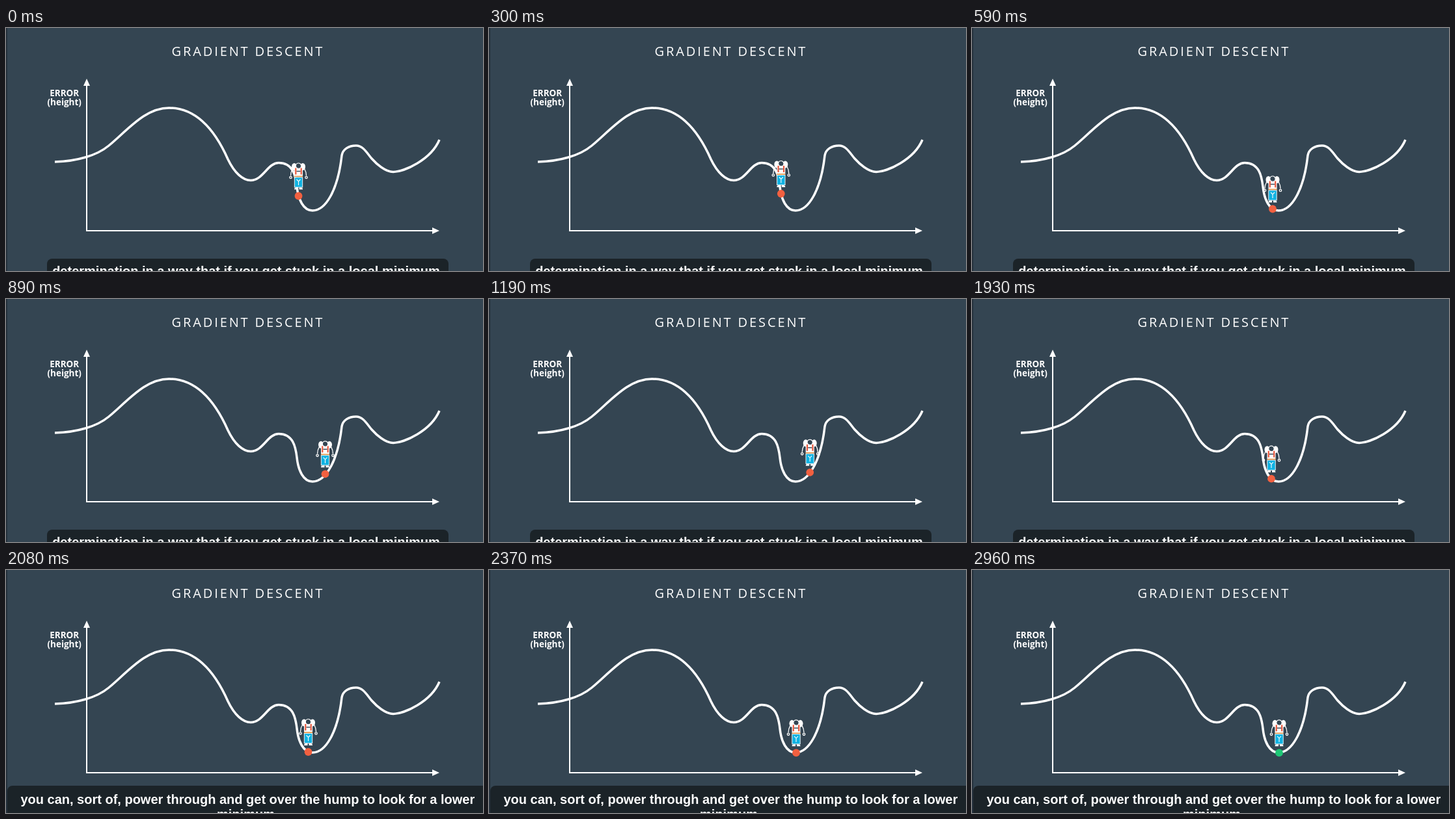
An HTML page for the animation above (5110 ms loop, 733 px wide and 374 px high).

```html
<!DOCTYPE html>
<html lang="en">
<head>
<meta charset="utf-8">
<title>Gradient descent</title>
<style>
  html, body { margin: 0; width: 100%; height: 100%; overflow: hidden; background: #344552; }
  svg { display: block; }
  .label { font: 700 13.5px "Open Sans", sans-serif; text-anchor: middle; }
  .caption { font: 700 20px "Liberation Sans", Arial, sans-serif; text-anchor: middle; }
</style>
</head>
<body>
<svg width="733" height="374" viewBox="0 0 733 374" fill="#fff">
  <rect width="2" height="374" fill="#25313c"/>
  <text x="254.6" y="42.5" font-family="Open Sans, sans-serif" font-size="20" letter-spacing="2.87">GRADIENT DESCENT</text>
  <text class="label" x="89.7" y="105">ERROR</text>
  <text class="label" x="89.7" y="118.5">(height)</text>

  <path d="M124 86V312H658" fill="none" stroke="#fff" stroke-width="2"/>
  <path d="M124 78l5 11h-10zM666 312l-11 -5v10z"/>
  <path fill="none" stroke="#fff" stroke-width="3.5" d="M75 206C110 205 140 196 158 181
    C188 156 214 123 250.5 123C292 123 321 157 341 202C351 223 364 234.5 376 234.5
    C395 234.5 402 207.5 419 207.5C441 207.5 445 227 447 244C449 264 457 281 471 281
    C491 281 510 250 516 196C517.5 187 526 181 538 181C549 181 555 193 562 201
    S583 221.5 595 221.5C612 221 653 203 666 172"/>

  <g id="hiker">
    <g fill="none" stroke="#fff" stroke-width="1.3">
      <path d="M-9 -42Q-12 -37 -12 -31M9 -42Q12 -37 12 -31"/>
      <circle cx="-12" cy="-28.5" r="1.7"/>
      <circle cx="12" cy="-28.5" r="1.7"/>
    </g>
    <ellipse cx="-6.5" cy="-45" rx="4" ry="5.5"/>
    <ellipse cx="6.5" cy="-45" rx="4" ry="5.5"/>
    <rect x="-6.5" y="-45" width="13" height="15"/>
    <path d="M-4.2 -43v10M4.2 -43v10" stroke="#e9573c" stroke-width="2.2"/>
    <path d="M-3 -38h6" stroke="#344552" stroke-width="1.4"/>
    <circle cy="-46.3" r="4.2" fill="#344552" stroke="#fff" stroke-width="1.2"/>
    <rect x="-6.5" y="-31" width="13" height="2" fill="#e8a15b"/>
    <rect x="-6.2" y="-28.6" width="12.4" height="15.2" fill="#10b2e2" stroke="#fff" stroke-width=".9"/>
    <path d="M-3 -25.5L0 -22.5L3 -25.5M0 -22.5V-16.5" fill="none" stroke="#fff" stroke-width="1.1"/>
    <path d="M-6.5 -10q0 -3 3 -3h2.5v3zM6.5 -10q0 -3 -3 -3h-2.5v3z"/>
    <circle id="ball" r="5.9"/>
  </g>

  <g id="captionA" class="caption">
    <rect x="63" y="355" width="617" height="40" rx="8" fill="#1b2328"/>
    <text x="369" y="381.3">determination in a way that if you get stuck in a local minimum</text>
  </g>
  <g id="captionB" class="caption">
    <rect x="2" y="332" width="739" height="60" rx="8" fill="#1b2328"/>
    <text x="371.3" y="360">you can, sort of, power through and get over the hump to look for a lower</text>
    <text x="371.3" y="383">minimum.</text>
  </g>
</svg>
<script>
const LOOP = 5110, TICK = 148.1;
const ORANGE = [242, 96, 64], GREEN = [31, 199, 118];

// Ball position per tick: it rocks in the valley, then settles at the bottom.
const path = [
  [449.5, 258.5], [448.7, 254.5], [448.8, 255], [451.7, 264], [462, 278.5], [477, 280],
  [490.5, 269.3], [495.2, 264.3], [493.2, 266.8], [486.5, 273.2], [475, 280.5],
  [462, 278.8], [458.7, 275.5], [460, 276.7], [464.5, 280], [469.5, 281], [472, 281.3]
];
const byId = id => document.getElementById(id);
const hiker = byId("hiker"), ball = byId("ball");
const captionA = byId("captionA"), captionB = byId("captionB");

function draw(now) {
  const tick = Math.floor((now % LOOP + 5) / TICK);
  const [x, y] = path[Math.min(tick, path.length - 1)];
  const mix = Math.min(1, Math.max(0, (tick - 16) / 4));
  const color = ORANGE.map((c, i) => Math.round(c + (GREEN[i] - c) * mix));

  hiker.setAttribute("transform", `translate(${x} ${y})`);
  ball.setAttribute("fill", `rgb(${color})`);
  captionA.style.display = tick < 14 ? "" : "none";
  captionB.style.display = tick < 14 ? "none" : "";
}

const start = performance.now();
function loop() {
  draw(performance.now() - start);
  requestAnimationFrame(loop);
}
loop();
</script>
</body>
</html>
```
